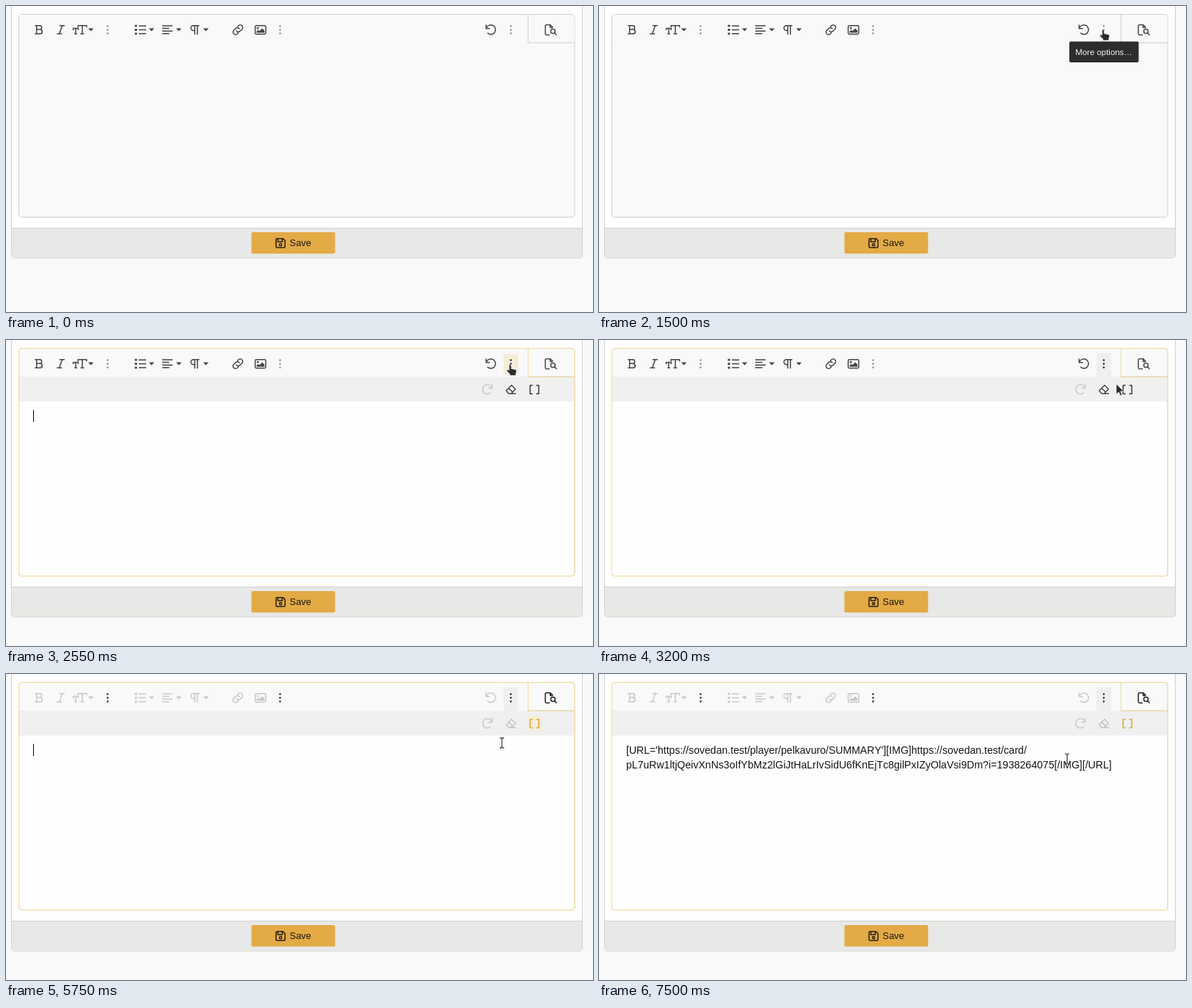
These frames come from a looping animation (800x418 px, 8 s). An HTML page:

```html
<!DOCTYPE html>
<html lang="en">
<head>
<meta charset="utf-8">
<title>Editor toolbar</title>
<style>
html, body { margin: 0; width: 100%; height: 100%; overflow: hidden; background: #f9f9f9; }
svg { display: block; }
text { font-family: "Liberation Sans", Arial, sans-serif; font-kerning: none; white-space: pre; }
.icon { fill: none; stroke: #444; stroke-width: 1.5; stroke-linejoin: round; }
.solid { fill: #444; stroke: none; }
.line { fill: none; stroke: #d0d0d3; }
.gold { fill: none; stroke: #f3d793; }
.warm { fill: #f6ecd8; }
.tip rect { fill: #2d2d2d; }
.tip text { fill: #f4f4f4; font-size: 11.45px; text-anchor: middle; }
#pointer path { stroke: #fff; stroke-width: .6; fill: #2a2a2a; }
</style>
</head>
<body>
<svg width="800" height="418">
  <defs>
    <path id="down" class="solid" d="M0 30.5h7.4l-3.7 3.9z"/>
    <path id="dots" d="M0 27.4v.01M0 32.4v.01M0 37.4v.01" stroke="#222" stroke-width="2.5" stroke-linecap="round"/>
    <path id="turn" d="M-6.3 -3A6.4 6.4 0 1 1 -5.2 4.2M-7 -7v5.2h5.2" fill="none"/>
    <path id="frame" d="M775 50.2H711.5V12"/>
  </defs>

  <rect id="card" class="line" x="7.5" y="-10" width="778" rx="4" style="fill:#fefefe"/>
  <g id="low">
    <path d="M8 303.5H785V341a3.5 3.5 0 0 1-3.5 3.5H11.5A3.5 3.5 0 0 1 8 341z" fill="#e8e8e6"/>
    <path class="line" d="M8 303.5H785"/>
    <rect x="334.5" y="309" width="114" height="29.3" rx="2" fill="#e3aa46"/>
    <g fill="none" stroke="#2a2112" stroke-width="1.5">
      <path d="M369.5 317.8H377.5L380.3 320.6V328.6a1.5 1.5 0 0 1-1.5 1.5H369.5a1.5 1.5 0 0 1-1.5-1.5V319.3a1.5 1.5 0 0 1 1.5-1.5zM370.5 318v4h6v-4"/>
      <circle cx="374.2" cy="326.2" r="1.6"/>
    </g>
    <text x="386.6" y="328" font-size="12.8" fill="#1c1710">Save</text>
  </g>

  <rect class="box line" x="17.5" y="11.5" width="757.5" rx="4" style="fill:#f9f9f9"/>
  <rect id="page" class="box" x="18" y="12" width="756.5" rx="4" fill="#fefefe"/>
  <rect x="18" y="12" width="756.5" height="38" rx="3" fill="#f9f9f9"/>
  <rect id="active" x="678" y="18" width="20" height="32.5" rx="2" fill="#efefef"/>

  <svg id="row" y="50" width="800" height="0">
    <g transform="translate(0 -50)">
      <path d="M18 50H774.5V84H18z" fill="#f0f0f0"/>
      <rect id="hoverCode" class="warm" x="709.5" y="57" width="21.5" height="21.5" rx="2"/>
      <use href="#turn" class="icon" style="stroke:#c9c9c9" transform="translate(655.5 67.5) scale(-1 1)"/>
      <g class="icon fade">
        <path d="M681.6 69.2L689 61.8L694.4 67.2L688.4 73.2H685.2zM685 65.8L690.6 71.2M688 73.2H695" stroke-width="1.4"/>
      </g>
      <path id="code" class="icon" d="M717.8 61.9H714.3V73.4H717.8M722.6 61.9H726.1V73.4H722.6"/>
    </g>
  </svg>

  <rect id="hoverMore" class="warm" x="678" y="19" width="20" height="27" rx="2"/>
  <g class="icon fade">
    <path d="M39.3 26.7H46a2.7 2.7 0 0 1 0 5.4H41.7M46 32.1a3 3 0 0 1 .6 6H39.3M41.7 26.7V38.1"/>
    <path d="M73 26.7H80M69.3 38.1H76.3M76.7 26.7L72.6 38.1"/>
    <path d="M98.2 29.3V26.7H109.8V29.3M104 26.7V38.1M101.5 38.1H106.5M91.6 33V30.6H98.4V33M95 30.6V38.1M93.2 38.1H96.8"/>
    <path d="M181 27.2H191M181 32.5H191M181 37.8H191"/>
    <path d="M175.6 27.2H178.6M175.6 32.5H178.6M175.6 37.8H178.6" stroke-width="2.8"/>
    <path d="M213 27H227M213 30.6H222.5M213 34.2H227M213 37.8H222.5"/>
    <path d="M263.5 26.7H255.4a3.4 3.4 0 0 0 0 6.8H257.3M257.3 26.7V39M260.8 26.7V39"/>
    <g transform="rotate(-45 316 32.5)">
      <path d="M314 35.9H311.5a3.4 3.4 0 0 1 0-6.8H315.2a3.4 3.4 0 0 1 3.2 4.4M318 29.1H320.5a3.4 3.4 0 0 1 0 6.8H316.8a3.4 3.4 0 0 1-3.2-4.4"/>
    </g>
    <rect x="339.6" y="26.8" width="14.4" height="11.6" rx="1.6"/>
    <path class="solid" d="M341.5 36.6V34.8L343.8 32.8L345.4 34.2L349.2 30.4L352.2 33.4V36.6zM341.8 30.2a1.4 1.4 0 1 1 2.8 0a1.4 1.4 0 1 1-2.8 0"/>
    <use href="#turn" transform="translate(661.3 32.5)"/>
    <use href="#down" x="112"/><use href="#down" x="194.7"/>
    <use href="#down" x="231.8"/><use href="#down" x="268.8"/>
  </g>
  <g id="menus"><use href="#dots" x="138.5"/><use href="#dots" x="373.5"/></g>
  <use id="more" href="#dots" x="688"/>
  <path id="preview" class="icon" style="stroke:#222" d="M741 39.4H736.4a1.4 1.4 0 0 1-1.4-1.4V27.2a1.4 1.4 0 0 1 1.4-1.4H741.8L745.4 29.4M741.6 26V29.6H745.2M742.4 34.6a3 3 0 1 1 6 0a3 3 0 1 1-6 0M747.6 36.8L750.6 39.8"/>

  <use href="#frame" class="line"/>
  <g id="focus">
    <rect class="box gold" x="17.5" y="11.5" width="757.5" rx="4"/>
    <use href="#frame" class="gold"/>
  </g>

  <path id="caret" d="M37.5 95.5V112" stroke="#111" stroke-width="1.1"/>
  <g id="pasted" font-size="14.07" fill="#161616">
    <text x="37" y="109">[URL='https://sovedan.test/player/pelkavuro/SUMMARY'][IMG]https://sovedan.test/card/</text>
    <text x="37" y="129">pL7uRw1ltjQeivXnNs3oIfYbMz2lGiJtHaLrIvSidU6fKnEjTc8gilPxIZyOlaVsi9Dm?i=1938264075[/IMG][/URL]</text>
  </g>

  <g id="tipMore" class="tip">
    <rect x="641" y="48.5" width="94.5" height="28.5" rx="2"/>
    <text x="688" y="66.6">More options…</text>
  </g>
  <g id="tipCode" class="tip">
    <rect x="671.5" y="83.5" width="97.5" height="28.5" rx="2"/>
    <text x="720.2" y="101.7">Toggle BB code</text>
  </g>

  <g id="pointer">
    <path id="arrow" d="M0 0V14L3.3 11L5.6 16L7.8 15L5.6 10.2H10z"/>
    <path id="hand" d="M-1.3 1.2a1.3 1.3 0 0 1 2.6 0V5.6L7.4 7q1.6.4 1.4 2.2L7.8 12.6V15H-.2V13.2L-4 9.2q-.9-1.4.3-2t2.4 1z"/>
    <path id="beam" d="M-3 -7Q0 -7 0 -5.2Q0 -7 3 -7M0 -5.2V5.2M-3 7Q0 7 0 5.2Q0 7 3 7" style="fill:none;stroke:#333;stroke-width:1.2"/>
  </g>
</svg>
<script>
const LOOP = 8000, GROW = 34;
const $ = id => document.getElementById(id);
const all = sel => document.querySelectorAll(sel);
const boxes = all('.box'), fading = all('.fade');

// pointer stops: time, x, y
const stops = [
  [1000, 700, -17], [1450, 687, 30], [1600, 687, 33.5], [2750, 687, 33.5],
  [3200, 705, 60], [3550, 705, 60], [3700, 720, 70], [5600, 720, 70],
  [5750, 676, 94], [6300, 638, 116], [LOOP, 638, 116]
];

const show = (id, v) => $(id).setAttribute('opacity', +v);
const within = (t, a, b) => t >= a && t < b;

function pointerAt(t) {
  const i = stops.findIndex(s => s[0] > t);
  if (i < 1) return [700, -30];
  const [a, x, y] = stops[i - 1], [b, u, v] = stops[i];
  const p = (t - a) / (b - a), e = p * (2 - p);
  return [x + (u - x) * e, y + (v - y) * e];
}

function draw(t) {
  const ramp = (a, b) => Math.min(1, Math.max(0, (t - a) / (b - a)));
  const pulse = (a, b, c, d) => ramp(a, b) - ramp(c, d);

  // second toolbar row opens and pushes the footer down
  const h = GROW * (1 - (1 - ramp(1950, 2280)) ** 2);
  $('card').setAttribute('height', 354.5 + h);
  boxes.forEach(b => b.setAttribute('height', 277 + h));
  $('row').setAttribute('height', h);
  $('low').setAttribute('transform', `translate(0 ${h})`);

  const focus = ramp(1930, 2080);
  show('page', focus);
  show('focus', ramp(1930, 2150));
  show('active', ramp(2750, 2900));
  show('more', .5 + .5 * ramp(1950, 2250));
  show('hoverMore', pulse(2000, 2400, 2800, 2950));
  show('hoverCode', pulse(3600, 3750, 5700, 5950));

  // plain code mode greys out the formatting tools
  const plain = ramp(4450, 4700);
  fading.forEach(g => g.setAttribute('opacity', 1 - .73 * plain));
  show('menus', .5 + .5 * plain);
  show('preview', .82 + .18 * plain);
  $('code').style.stroke = `color-mix(in srgb, #e0a63c ${plain * 100}%, #3a3a3a)`;

  show('tipMore', pulse(1380, 1480, 1900, 2000));
  show('tipCode', pulse(3680, 3820, 4450, 4550));

  show('pasted', t >= 6000);
  show('caret', [[1980, 3050], [3550, 4050], [4600, 5100], [5600, 6450]].some(s => within(t, ...s)));
  const [cx, cy] = t >= 6000 ? [661, 20] : [0, h - GROW];
  $('caret').setAttribute('transform', `translate(${cx} ${cy})`);

  const arrow = t < 1350 || within(t, 2850, 3600), beam = t >= 5680;
  show('arrow', arrow);
  show('beam', beam);
  show('hand', !arrow && !beam);
  $('pointer').setAttribute('transform', `translate(${pointerAt(t)})`);
}

function tick() {
  draw(performance.now() % LOOP);
  requestAnimationFrame(tick);
}
tick();
</script>
</body>
</html>
```
